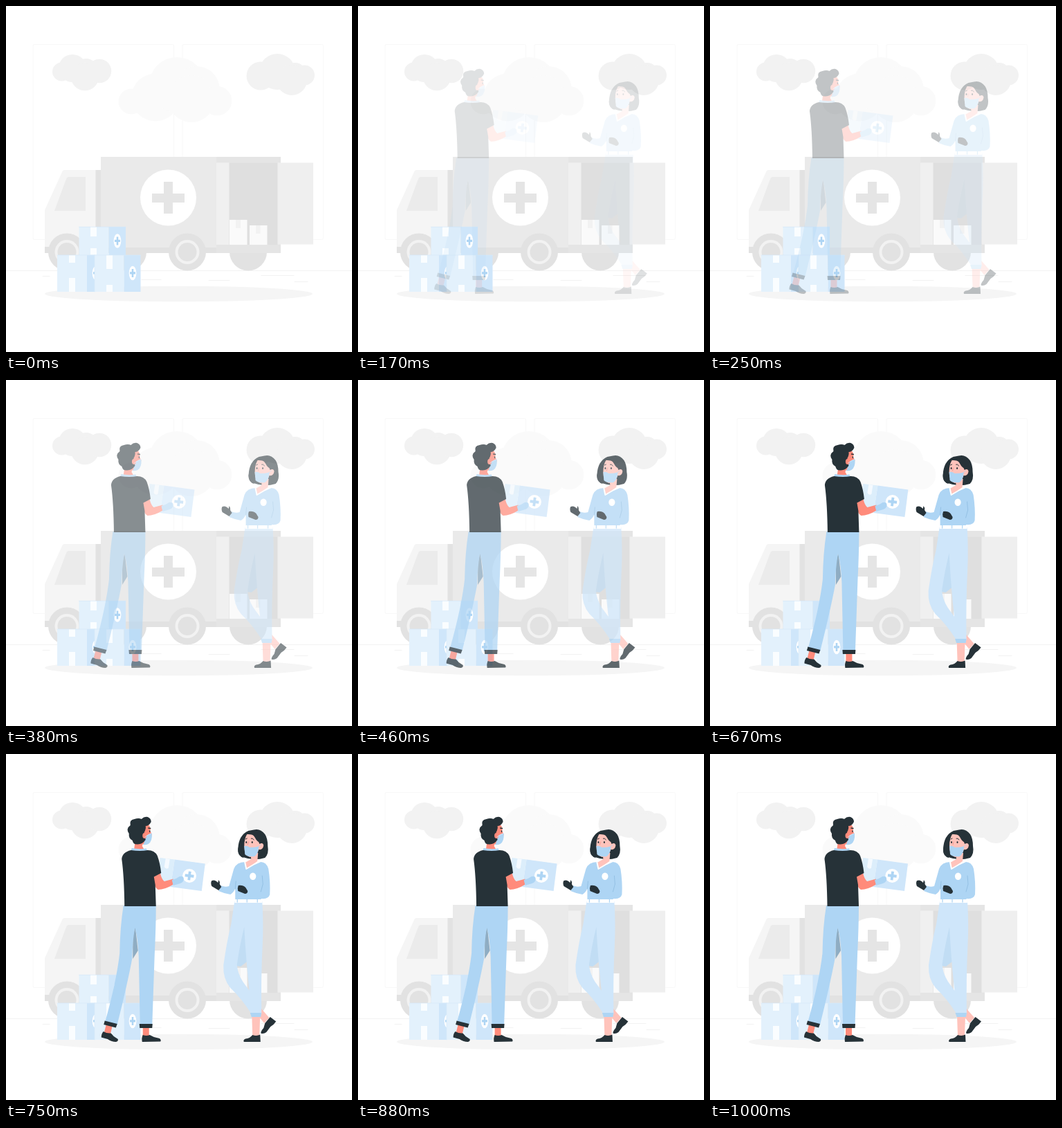
An HTML page that plays this animation: 500x500 px, repeating every 1040 ms.

```html
<!DOCTYPE html>
<html lang="en">
<head>
<meta charset="utf-8">
<title>Relief delivery</title>
<style>
  html, body { margin: 0; width: 100%; height: 100%; overflow: hidden; background: #fff; }
  svg { display: block; width: 100%; height: 100%; }
  .ink { fill: #263238; }
  .blue { fill: #aed5f4; }
  .pale { fill: #cfe6fa; }
  .mist { fill: #e3f1fc; }
  .skin { fill: #ff8b7b; }
  .rose { fill: #ffc3bb; }
  .white { fill: #fff; }
  .g1 { fill: #fafafa; }
  .g2 { fill: #f2f2f2; }
  .g3 { fill: #ebebeb; }
  .g4 { fill: #e2e2e2; }
  .line { fill: none; stroke-linecap: round; stroke-linejoin: round; }
</style>
</head>
<body>
<svg viewBox="0 0 500 500">
  <defs>
    <path id="plus" d="M-3-10H3V-3H10V3H3V10H-3V3H-10V-3H-3Z"/>
    <g id="label">
      <ellipse class="white" rx="5.3" ry="10.3"/>
      <path class="blue" d="M-1.3-6H1.3V-1.8H4V1.6H1.3V6H-1.3V1.6H-4V-1.8H-1.3Z"/>
    </g>
    <g id="wheel">
      <circle class="g4" r="27"/>
      <circle class="g2" r="17.5"/>
      <circle class="g4" r="13.5"/>
    </g>
  </defs>

  <!-- windows, clouds and ground -->
  <g fill="#fff" stroke="#f8f8f8">
    <rect x="39" y="55.5" width="203.5" height="282" rx="2"/>
    <rect x="255" y="55.5" width="203.5" height="282" rx="2"/>
  </g>
  <g class="g2" id="sideClouds"></g>
  <g class="g1" id="midCloud"></g>
  <path class="line" stroke="#f2f2f2" d="M0 382.5H500M53 390.5H63M196 395.5H224M293 396.5H323M369 389.5H416M417 398.5H436"/>
  <ellipse fill="#f5f5f5" cx="249.5" cy="416" rx="193.5" ry="11.3"/>

  <!-- truck -->
  <g>
    <circle class="g4" cx="176" cy="355.5" r="27"/>
    <circle class="g4" cx="350" cy="355.5" r="27"/>
    <path class="g4" d="M56 348H397V357H56Z"/>
    <path fill="#f5f5f5" d="M56 348V295L81 240Q82 237 85 237H130V348Z"/>
    <path class="g3" d="M70 296L87 250Q88 247 91 247H115V296Z"/>
    <path class="g4" d="M129.500 237H138V348H129.500Z"/>
    <path fill="#eaeaea" d="M137 218H397V349H137Z"/>
    <path fill="#e5e5e5" d="M304 218H397V226.500H304ZM304 345H397V357H304Z"/>
    <path fill="#f0f0f0" d="M304 226.500H323V345H304Z"/>
    <path fill="#dfdfdf" d="M322.500 226.500H393V345H322.500Z"/>
    <path class="g1" d="M323 309H348.500V345H323ZM352 317H377.500V345H352Z"/>
    <path class="g2" d="M332 309H339V321H332ZM361 317H367.500V329H361Z"/>
    <path fill="#efefef" d="M392.500 226.500H444V344.500H392.500Z"/>
    <use href="#wheel" x="88" y="355.500"/>
    <use href="#wheel" x="262" y="355.500"/>
    <circle class="white" cx="234.500" cy="277" r="40.500"/>
    <path fill="#e5e5e5" d="M228 254H241V271H258V284H241V300H228V284H211V271H228Z"/>
  </g>

  <!-- stacked boxes -->
  <g>
    <path class="mist" d="M105.500 319H148.500V360H105.500ZM74 360H117V413H74Z"/>
    <path class="pale" d="M148.500 319H173V360H148.500ZM117 360H141V413H117Z"/>
    <use href="#label" x="161" y="339.500"/>
    <use href="#label" x="130" y="386"/>
    <path class="mist" d="M128 360H170.500V413H128Z"/>
    <path class="pale" d="M170.500 360H194.500V413H170.500Z"/>
    <use href="#label" x="183" y="386"/>
    <path fill="#fafdff" d="M122 319H131V333H122ZM122 350H131V359.500H122ZM91 360H100V371H91ZM91 393H100V413H91ZM145 360H154V380H145ZM145 403H154V413H145Z"/>
    <path class="line" stroke="#d6e9f8" stroke-width=".7" d="M105.500 319.300H173M74 360H194.500M128 360V413"/>
  </g>

  <g id="man">
    <!-- carried box -->
    <path class="mist" style="fill:#dceefb" d="M221 150L242 152.500L236 192L216 189Z"/>
    <path class="pale" d="M242 152.500L286 158.500L281 198L236 192Z"/>
    <path fill="#f5faff" d="M229 151L235 152L233 165Q229 167 227 163Z"/>
    <circle class="white" cx="263.300" cy="176" r="10"/>
    <use href="#plus" class="blue" transform="translate(263.300 176) rotate(7) scale(.64)"/>
    <!-- feet -->
    <path class="skin" d="M143 391L152 393L149 405L140 403ZM196 395H205V408H196Z"/>
    <path class="ink" d="M139 401Q144 404 150 403.500L154 408L160 412Q161 415 157 416Q151 416 145 412L136 409.500Q136 404 139 401ZM196 406Q201 408 206 406L212 409L220 411Q223 413 221.500 415.500L195 416Q194 410 196 406Z"/>
    <!-- trousers -->
    <path fill="#8fadc3" d="M185 249L181.500 265V296L189 284Z"/>
    <path class="blue" d="M168 219H215Q215 250 213 290L209.500 392H192L190 292Q189 267 184.500 251Q181 272 180.500 296Q174 331 159 391L141.500 387Q158 328 162.500 288Q163 250 168 219Z"/>
    <path class="ink" d="M141 385.500L159 390L157 395.500L139.500 391ZM191 390H210L209.500 396H191.500Z"/>
    <!-- arm -->
    <path class="skin" d="M208 177L221 171.500Q223 181 227 184L240 180.500V188.500Q228 196 218 196Q213 194 208 177Z"/>
    <path class="blue" d="M238 182L244 180L249 177Q254 176 255 179Q256 185 250 187L240 190Z"/>
    <!-- torso and head -->
    <path class="skin" d="M185 126H197L195 133Q197 137 199 139L183 140Z"/>
    <path class="blue" d="M180 136Q191 138 201 136.500L203 141H178Z"/>
    <path class="ink" d="M179 139Q192 141 203 139Q213 139 217 147Q221 158 222.500 172L212 177.500L214 189L215 220H169.500Q169 177 165.500 152Q166 142 179 139Z"/>
    <path class="skin" d="M193 106L204 102Q208 106 206.500 111L209 116Q208 127 200 130Q194 132 188 126Z"/>
    <path class="blue" d="M199 120Q204 115 209 114.500Q210 126 204 130Q200 132 196.500 131Q199 127 199 120Z"/>
    <path class="ink" d="M198 113L200 124Q195 131 188 130.500Q182 131 181 125Q175 122 176 115Q171 108 178 103Q176 95 184 94Q190 92 194 94Q198 90 203 91Q208 93 208 98Q205 104 200 104Q201 108 198 113Z"/>
    <ellipse class="skin" cx="198.500" cy="118" rx="3" ry="4"/>
    <path class="line" stroke="#d6eafb" stroke-width=".8" d="M199 120Q203 117 208 115"/>
    <path class="line" stroke="#263238" stroke-width="1.300" d="M204 107L207 107.500M206 111V112.500"/>
  </g>

  <g id="woman">
    <!-- legs -->
    <path class="rose" d="M357 377H369L368 408H358ZM368 365L382 381L375 389L366 378Z"/>
    <path class="ink" d="M358 406Q364 408 369 405.500L369.500 416H345.500Q344 413 348 411.500Q354 411 358 406ZM383.500 380L392 386.500Q389 391 384 394L378 402Q374 405 370 403.500Q370 400 374 396L376 389Z"/>
    <path fill="#c1ddf4" d="M347 242L333 306L341 307L350 300Z"/>
    <path class="pale" d="M332 213H372Q374 246 372.500 275Q370 326 371 376L356 375Q342 353 326 338Q315 325 316 305Q321 270 327 246ZM346 250Q340 274 335.500 304Q336 316 344 329L353.500 342Q349 305 346 250Z" fill-rule="evenodd"/>
    <path class="blue" d="M354.500 374H371L370 380H356.500Z"/>
    <path class="white" d="M333 209H371L372 215H332Z"/>
    <path class="line" stroke="#aed5f4" stroke-width="1.300" d="M336 210V214M350 210V214M365 210V214"/>
    <!-- blouse and hands -->
    <path class="blue" d="M347 156L361 160L370 156Q378 156 381 166Q384 185 383 203Q381 210 371 209L370 210H333V194Q331 200 326 203Q318 202 309 198L312 190Q318 193 324 191L331 166Q335 156 347 156Z"/>
    <path class="line" stroke="#8dbbe0" stroke-width=".8" d="M372 176L373 188L370 199M334 184L333 195"/>
    <ellipse class="white" cx="358.500" cy="176.800" rx="4.600" ry="5.200"/>
    <path class="ink" d="M299 183Q304 181 308 186L309 182Q311 184 310.500 188L313 192L309 197Q304 194 299 191Q297 186 299 183ZM337.500 190Q344 189 348 193L351 198Q351 202 347 202L337 198Q336 193 337.500 190Z"/>
    <!-- head -->
    <path class="ink" d="M360 109.500Q369 107 376 116Q380 122 380 133Q382 144 376 150Q360 155 344 149Q336 146 337 137Q338 117 352 111Z"/>
    <path class="rose" d="M355 143H366L365 155L350 166L347 157L356 152Z"/>
    <path class="line" stroke="#fff" stroke-width="2" d="M347 156.500L349 166L366 156"/>
    <path class="rose" d="M350 116Q361 115 366 124L368 130Q373 127 374 132Q373 139 367 138Q364 149 354 149Q346 146 346 133Q346 122 350 116Z"/>
    <path class="ink" d="M351 112Q344 121 345 150Q337 148 337 138Q339 120 351 112ZM355 112L364 112L371 129Q365 128 361 120Z"/>
    <path class="blue" d="M346 133Q350 132 354 135Q361 135 367 133.500Q367 143 361 148Q351 149 347 145Z"/>
    <path class="line" stroke="#aed5f4" stroke-width=".8" d="M365 135L370 131"/>
    <path class="line" stroke="#263238" d="M348 123L350 122M356 122Q358 121 360 124"/>
    <ellipse class="ink" cx="349" cy="127.500" rx="1" ry="1.500"/>
    <ellipse class="ink" cx="357.500" cy="127.500" rx="1" ry="1.500"/>
    <path class="line" stroke="#ef8f86" stroke-width=".8" d="M352 127L351 131"/>
  </g>
</svg>
<script>
const byId = id => document.getElementById(id);

// Clouds are clusters of circles: [cx, cy, r].
const puffs = list => list.map(([x, y, r]) => `<circle cx="${x}" cy="${y}" r="${r}"/>`).join('');
byId('sideClouds').innerHTML = puffs([
  [80.5, 95, 13.5], [96, 90, 20], [116, 92, 16], [114, 102, 20.3], [135, 94, 17.3],
  [368, 101, 20.5], [392, 95, 26], [418, 98, 16], [413, 107, 22], [431.5, 100, 14.5]
]);
byId('midCloud').innerHTML = puffs([
  [181, 138, 18.5], [216, 132, 34.5], [247, 114, 40], [275, 121, 34], [268, 134, 34], [305, 137, 21.3]
]);

const LOOP = 1040, FPS = 24, LEAD = 30, TRAVEL = 30;

const cubic = (s, a, b) => 3 * a * s * (1 - s) ** 2 + 3 * b * s * s * (1 - s) + s ** 3;

// cubic-bezier(.36, -.01, .5, 1.38)
function ease(x) {
  if (x >= 1) return 1;
  let lo = 0, hi = 1;
  for (let i = 0; i < 24; i++) {
    const mid = (lo + hi) / 2;
    if (cubic(mid, .36, .5) < x) lo = mid; else hi = mid;
  }
  return cubic(lo, -.01, 1.38);
}

function place(id, dx, opacity) {
  const node = byId(id);
  node.setAttribute('transform', `translate(${dx.toFixed(3)} 0)`);
  node.setAttribute('opacity', opacity);
}

function draw(ms) {
  // 24 steps per second, each starting on a 10 ms mark.
  const step = Math.floor((Math.floor(ms / 10) + .49) * FPS / 100);
  const p = ease((step * 1000 / FPS + LEAD) / 1000);
  const opacity = step < 3 ? 0 : Math.min(1, p);
  place('man', TRAVEL * (p - 1), opacity);
  place('woman', TRAVEL * (1 - p), opacity);
}

const start = performance.now();
function tick() {
  draw((performance.now() - start) % LOOP);
  requestAnimationFrame(tick);
}
tick();
</script>
</body>
</html>
```
